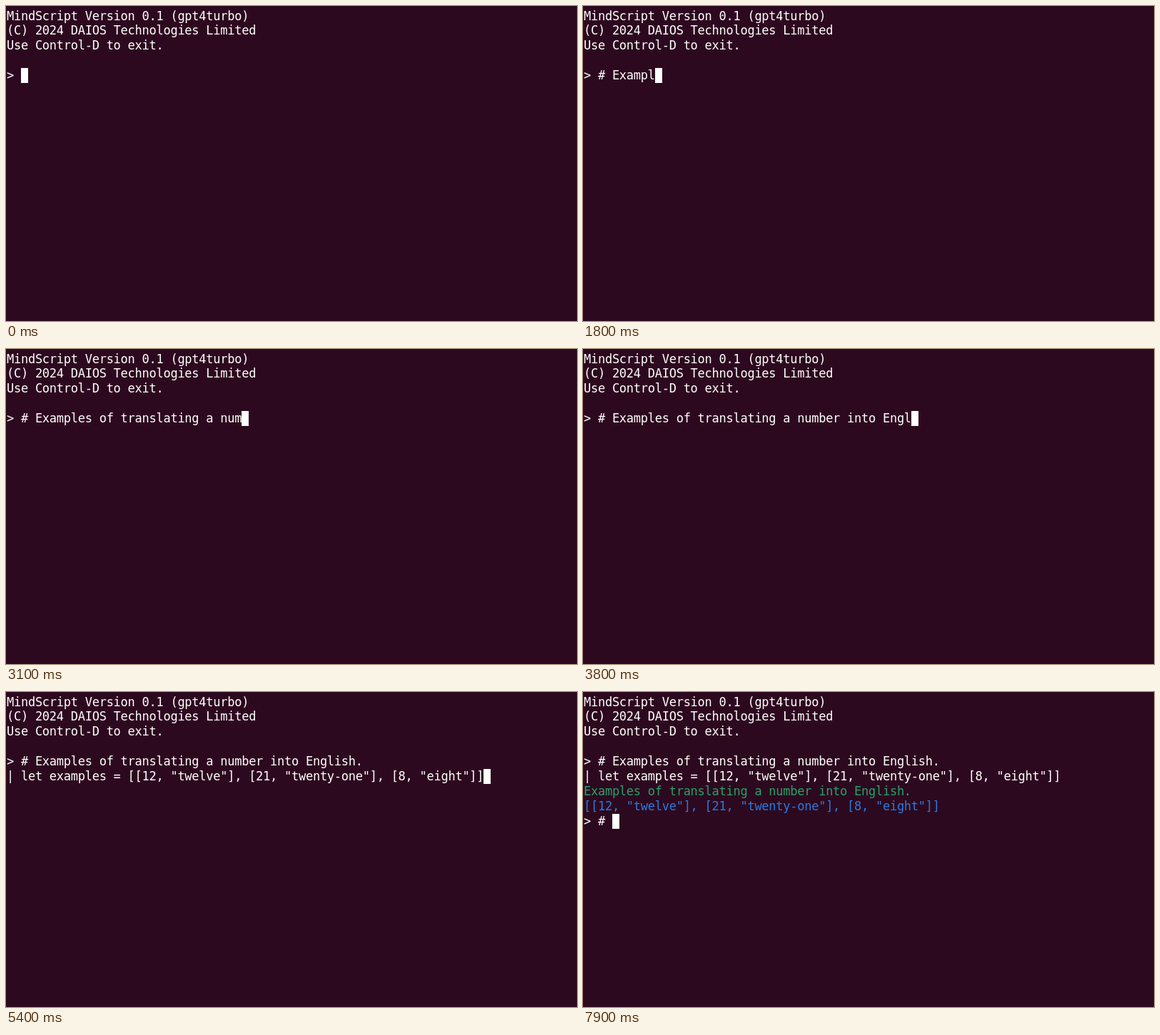
Animation, 800 px wide and 442 px high, one loop 8000 ms. Source, as an HTML page:

```html
<!DOCTYPE html>
<html lang="en">
<head>
<meta charset="utf-8">
<title>MindScript session</title>
<style>
  html, body { margin: 0; width: 100%; height: 100%; overflow: hidden; background: #2d091f; }
  #term {
    --cell: 9.975px;
    --row: 20.9px;
    position: absolute; left: 1px; top: 3.5px;
    font: 17px/20.9px "DejaVu Sans Mono", monospace;
    letter-spacing: -0.26px;
    font-variant-ligatures: none;
    white-space: pre;
    color: #fff;
  }
  #term div { position: absolute; left: 0; top: calc(var(--r) * var(--row)); height: var(--row); }
  #term .doc { color: #26a269; }
  #term .value { color: #2a7bde; }
  #term #cursor {
    left: calc(var(--c) * var(--cell));
    width: 10px; height: 21px;
    background: #fff;
  }
</style>
</head>
<body>
<div id="term"><div id="cursor"></div></div>
<script>
const LOOP = 8000, TICK = 100;
const BANNER = [
  'MindScript Version 0.1 (gpt4turbo)',
  '(C) 2024 DAIOS Technologies Limited',
  'Use Control-D to exit.',
  ''
];
const doc = 'Examples of translating a number into English.';
const value = '[[12, "twelve"], [21, "twenty-one"], [8, "eight"]]';
const comment = '# ' + doc;

// Typing pace as [time, characters typed]
const pace = [[1300, 0], [1400, 1], [2500, 19], [3800, 44], [4000, comment.length]];
const ENTER = 4200, PASTE = 5100, RUN = 6100, HASH = 7700, SPACE = 7900;

const term = document.getElementById('term');
const cursor = document.getElementById('cursor');
const rows = Array.from({ length: 9 }, (_, r) => {
  const row = document.createElement('div');
  row.style.setProperty('--r', r);
  term.insertBefore(row, cursor);
  return row;
});
rows[6].className = 'doc';
rows[7].className = 'value';

function typed(t) {
  if (t <= pace[0][0]) return 0;
  for (let i = 1; i < pace.length; i++) {
    const [t0, n0] = pace[i - 1], [t1, n1] = pace[i];
    if (t <= t1) return Math.round(n0 + (n1 - n0) * (t - t0) / (t1 - t0));
  }
  return comment.length;
}

function screen(t) {
  const lines = [...BANNER, '> ' + comment.slice(0, typed(t))];
  if (t >= ENTER) lines.push('| ' + (t >= PASTE ? 'let examples = ' + value : ''));
  if (t >= RUN) lines.push(doc, value, '> ' + (t >= SPACE ? '# ' : t >= HASH ? '#' : ''));
  return lines;
}

function draw(now) {
  const t = Math.floor(now % LOOP / TICK) * TICK;
  const lines = screen(t);
  rows.forEach((row, r) => {
    const text = lines[r] || '';
    if (row.textContent !== text) row.textContent = text;
  });
  cursor.style.setProperty('--r', lines.length - 1);
  cursor.style.setProperty('--c', lines[lines.length - 1].length);
}

const start = performance.now();
function frame() {
  draw(performance.now() - start);
  requestAnimationFrame(frame);
}
frame();
</script>
</body>
</html>
```
